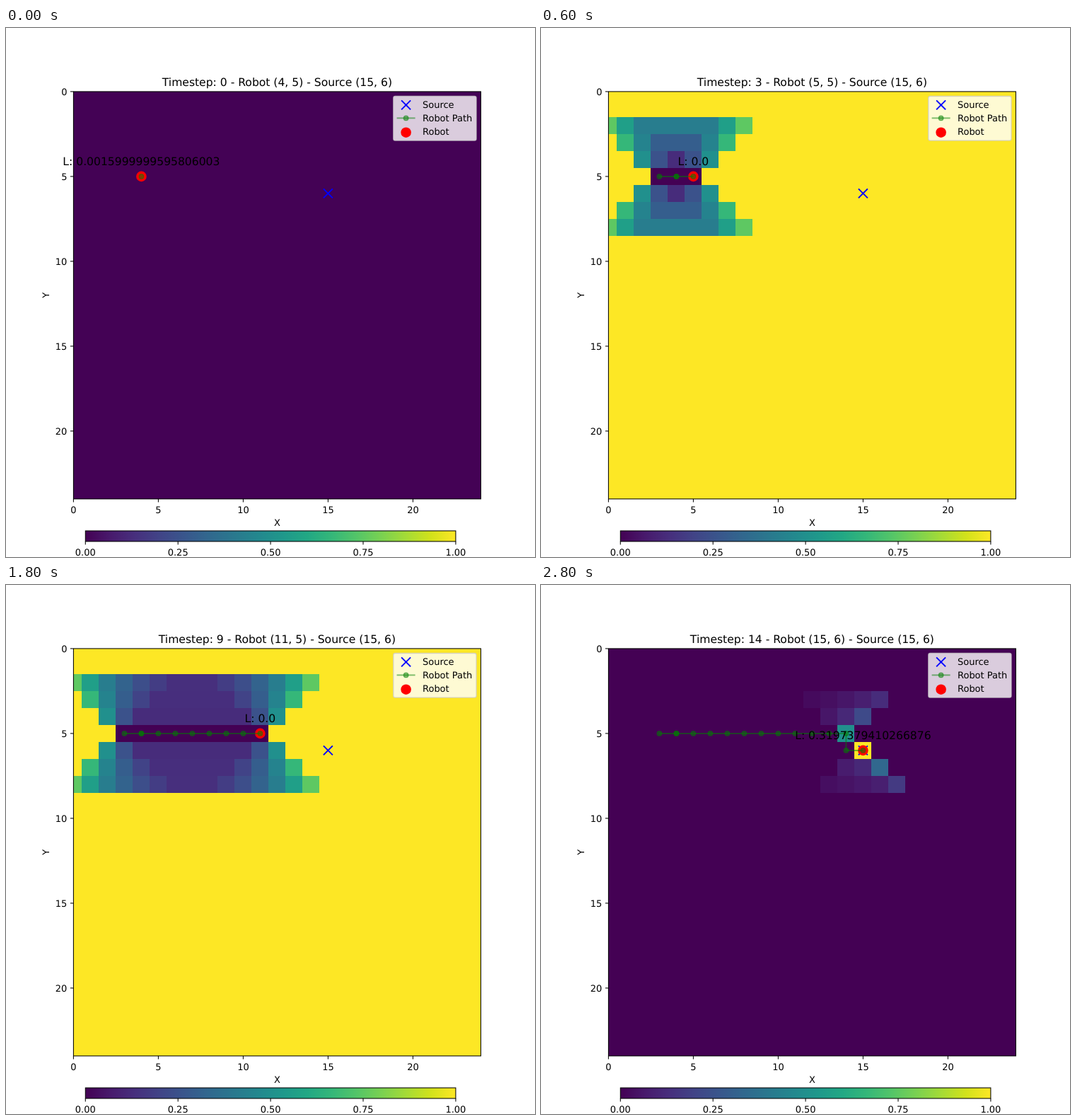
These frames come from a looping animation (748x748 px, 3000 ms). An HTML page:

```html
<!DOCTYPE html>
<html lang="en">
<head>
<meta charset="utf-8">
<title>Robot source search</title>
<style>
  html, body { margin: 0; width: 100%; height: 100%; overflow: hidden; background: #fff; }
  svg { display: block; width: 748px; height: 748px; }
  text { font-family: "DejaVu Sans", sans-serif; font-size: 12.99px; text-rendering: geometricPrecision; }
  .large { font-size: 15.58px; }
  .mid { text-anchor: middle; }
  .end { text-anchor: end; }
  .axis { fill: none; stroke: #000; stroke-width: 1.04; }
  .cells rect { shape-rendering: crispEdges; }
  .path { fill: none; stroke: #008000; stroke-width: 1.95; stroke-opacity: .5; stroke-linejoin: round; }
  .dot { fill: #008000; fill-opacity: .5; stroke: #008000; stroke-opacity: .5; stroke-width: 1.3; }
  .cross { fill: none; stroke: #00f; stroke-width: 1.95; }
  .robot { fill: #f00; }
</style>
</head>
<body>
<svg id="stage" viewBox="0 0 748 748" xmlns="http://www.w3.org/2000/svg"></svg>
<script>
const STEP_MS = 200, SIZE = 25, CELL = 24, LEFT = 95.4, TOP = 89.9, SPAN = 576;
const RIGHT = LEFT + SPAN, BOTTOM = TOP + SPAN;
const BAR = { x: 112.3, y: 711, w: 523.6, h: 15 };
const TICK = 4.5, RANGE = 3;
const SOURCE = [15, 6];
const VIRIDIS = ('440154 481a6c 472f7d 414487 39568c 31688e 2a788e 23888e ' +
  '1f988b 22a884 35b779 54c568 7ad151 a5db36 d2e21b fde725').split(' ');
const READINGS = { 0: '0.0015999999595806003', 12: '0.16076715290546417', 14: '0.3197379410266876' };

const route = [[4, 5]];
for (let x = 3; x <= 14; x++) route.push([x, 5]);
route.push([14, 6], [15, 6]);

const px = x => LEFT + CELL * x;
const py = y => TOP + CELL * y;

function color(v) {
  const at = Math.min(Math.max(v, 0), 1) * (VIRIDIS.length - 1);
  const i = Math.min(Math.floor(at), VIRIDIS.length - 2);
  const mix = [0, 2, 4].map(k => {
    const [a, b] = [VIRIDIS[i], VIRIDIS[i + 1]].map(h => parseInt(h.slice(k, k + 2), 16));
    return Math.round(a + (b - a) * (at - i));
  });
  return `rgb(${mix})`;
}

const text = (x, y, str, cls = '', extra = '') =>
  `<text x="${x}" y="${y}" class="${cls}" ${extra}>${str}</text>`;
const line = (x1, y1, x2, y2, cls) => `<path class="${cls}" d="M${x1} ${y1}L${x2} ${y2}"/>`;
const dot = (x, y) => `<circle class="dot" cx="${x}" cy="${y}" r="3.25"/>`;
const robotMark = (x, y) => `<circle class="robot" cx="${x}" cy="${y}" r="7.3"/>`;
const cross = (x, y) =>
  `<path class="cross" d="M${x - 6.5} ${y - 6.5}l13 13m0 -13l-13 13"/>`;
const box = (x, y, w, h, attrs) => `<rect x="${x}" y="${y}" width="${w}" height="${h}" ${attrs}/>`;

// The sensor sees a vertical double cone; its response falls off as 1 / (rows + 1).
function response([rx, ry], [x, y]) {
  const rows = Math.abs(y - ry);
  return rows <= RANGE && Math.abs(x - rx) <= rows ? 1 / (rows + 1) : 0;
}

function update(belief, robot) {
  const hit = response(robot, SOURCE) > 0;
  const next = belief.map((v, i) => {
    const p = response(robot, [i % SIZE, Math.floor(i / SIZE)]);
    return v * (hit ? p : 1 - p);
  });
  const max = Math.max(...next);
  return next.map(v => v / max);
}

function drawCells(belief) {
  const base = belief[belief.length - 1];
  let out = box(LEFT, TOP, SPAN, SPAN, `fill="${color(base)}"`);
  belief.forEach((v, i) => {
    if (v === base) return;
    const x = px(i % SIZE - .5), y = py(Math.floor(i / SIZE) - .5);
    const x0 = Math.max(x, LEFT), y0 = Math.max(y, TOP);
    out += box(x0, y0, Math.min(x + CELL, RIGHT) - x0, Math.min(y + CELL, BOTTOM) - y0,
      `fill="${color(v)}"`);
  });
  return `<g class="cells">${out}</g>`;
}

function drawStep(step, belief) {
  const [rx, ry] = route[step];
  const points = route.slice(0, step + 1).map(([x, y]) => [px(x), py(y)]);
  const title = `Timestep: ${step} - Robot (${rx}, ${ry}) - Source (${SOURCE.join(', ')})`;
  return `<g class="step" visibility="hidden">` + drawCells(belief) +
    cross(px(SOURCE[0]), py(SOURCE[1])) + robotMark(px(rx), py(ry)) +
    `<polyline class="path" points="${points.join(' ')}"/>` +
    points.map(p => dot(...p)).join('') +
    text(LEFT + SPAN / 2, 82.2, title, 'large mid') +
    text(px(rx), py(ry) - 15.5, 'L: ' + (READINGS[step] || '0.0'), 'large mid') + '</g>';
}

function drawAxes() {
  let out = box(LEFT, TOP, SPAN, SPAN, 'class="axis"');
  for (let v = 0; v <= 20; v += 5) {
    out += line(px(v), BOTTOM, px(v), BOTTOM + TICK, 'axis') + text(px(v), 685.6, v, 'mid') +
      line(LEFT, py(v), LEFT - TICK, py(v), 'axis') + text(LEFT - 9, py(v) + 4.8, v, 'end');
  }
  return out + text(LEFT + SPAN / 2, 703.6, 'X', 'mid') +
    text(0, 0, 'Y', 'mid', `transform="translate(61 ${TOP + SPAN / 2}) rotate(-90)"`);
}

function drawLegend() {
  const mid = 565.6, label = 589;
  return box(547.8, 96.5, 117.2, 62.6,
      'rx="2.6" fill="#fff" fill-opacity=".8" stroke="#ccc" stroke-opacity=".8" stroke-width="1.3"') +
    cross(mid, 108.9) + text(label, 112.5, 'Source') +
    line(mid - 13, 127.4, mid + 13, 127.4, 'path') + dot(mid, 127.4) + text(label, 131.5, 'Robot Path') +
    robotMark(mid, 147.7) + text(label, 150.8, 'Robot');
}

function drawColorbar() {
  const stops = VIRIDIS.map((c, i) =>
    `<stop offset="${i / (VIRIDIS.length - 1)}" stop-color="#${c}"/>`).join('');
  let out = `<defs><linearGradient id="viridis">${stops}</linearGradient></defs>` +
    box(BAR.x, BAR.y, BAR.w, BAR.h, 'fill="url(#viridis)"') +
    box(BAR.x, BAR.y, BAR.w, BAR.h, 'class="axis"');
  for (let v = 0; v <= 1; v += .25) {
    const x = BAR.x + BAR.w * v, y = BAR.y + BAR.h;
    out += line(x, y, x, y + TICK, 'axis') + text(x, 745.6, v.toFixed(2), 'mid');
  }
  return out;
}

let belief = Array(SIZE * SIZE).fill(1 / SIZE ** 2);
const steps = route.map((robot, i) => {
  if (i) belief = update(belief, robot);
  return drawStep(i, belief);
});
const stage = document.getElementById('stage');
stage.innerHTML = steps.join('') + drawAxes() + drawLegend() + drawColorbar();

const groups = [...stage.querySelectorAll('.step')];
let shown = -1;
function render() {
  const step = Math.floor(performance.now() / STEP_MS) % groups.length;
  if (step !== shown) {
    groups.forEach((g, i) => g.setAttribute('visibility', i === step ? 'visible' : 'hidden'));
    shown = step;
  }
  requestAnimationFrame(render);
}
render();
</script>
</body>
</html>
```
